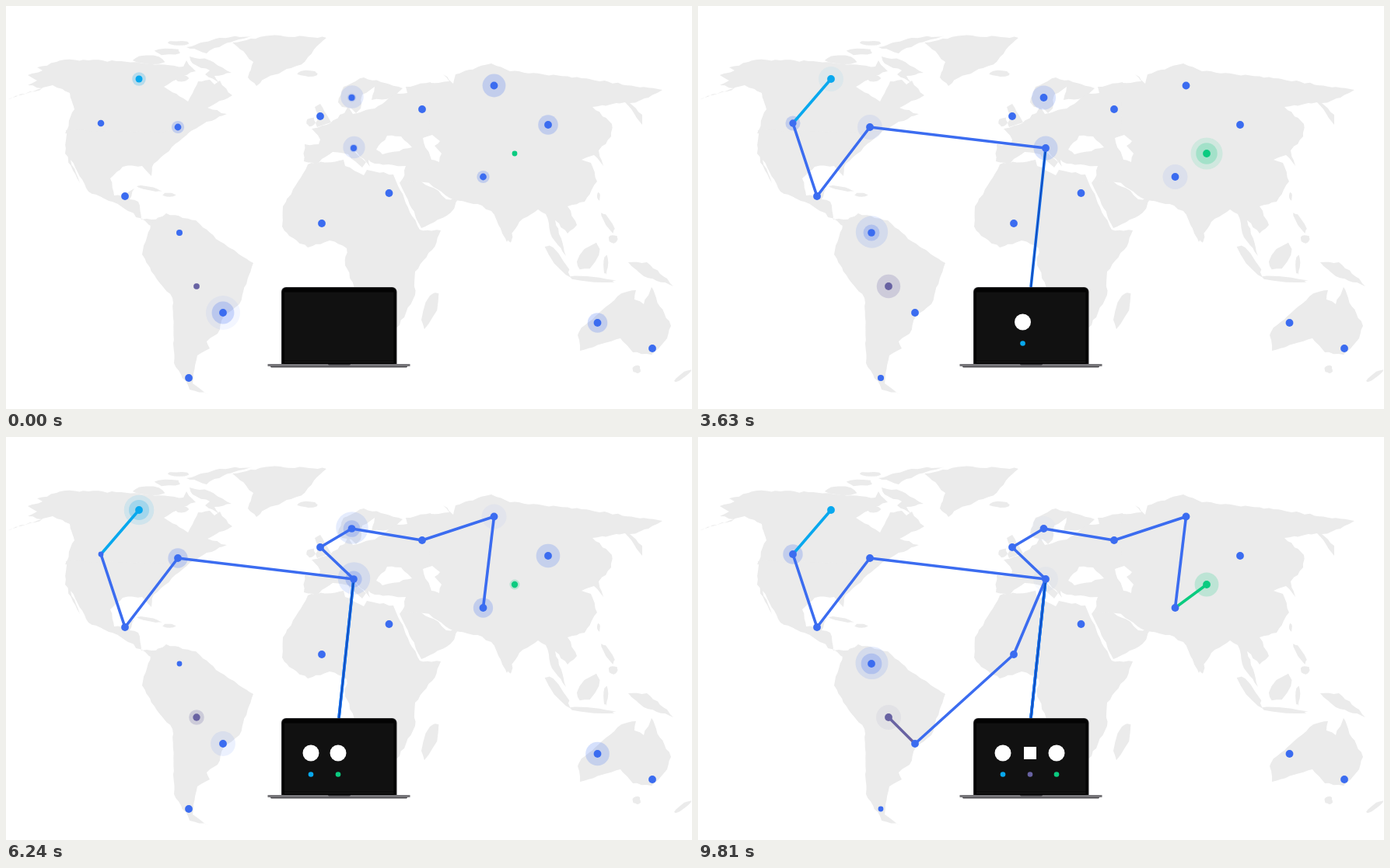
These frames come from a looping animation (882 by 519 pixels, 9840 ms). An HTML page with a canvas:

```html
<!DOCTYPE html>
<html lang="en">
<head>
<meta charset="utf-8">
<title>Network routes</title>
<style>
html, body { margin: 0; width: 100%; height: 100%; overflow: hidden; background: #fff; }
canvas { display: block; width: 882px; height: 519px; }
</style>
</head>
<body>
<canvas id="stage" width="882" height="519"></canvas>
<script>
const LOOP = 9840, PULSE = 3000;
const BLUE = '#3b6cf0', CYAN = '#08a8ee', GREEN = '#0bcb80', PURPLE = '#6862a2';
const LAND = '#ebebeb';
const ctx = document.getElementById('stage').getContext('2d');

const clamp = v => Math.min(1, Math.max(0, v));
const ramp = (t, from, to) => clamp((t - from) / (to - from));
const smooth = p => p * p * (3 - 2 * p);
const easeOut = (p, power) => 1 - (1 - p) ** power;

let seed = 7;
const noise = () => (seed = seed * 16807 % 2147483647) / 2147483647 - .5;

// A few corner points become a coast with small seeded bays
const map = [];
function coast(points, color = LAND, rough = 2.4) {
  const corners = points.split(' ').map(p => p.split(',').map(Number));
  const path = new Path2D();
  corners.forEach(([x, y], i) => {
    const [u, v] = corners[(i + 1) % corners.length];
    const parts = Math.max(1, Math.round(Math.hypot(u - x, v - y) / 6));
    path.lineTo(x, y);
    for (let k = 1; k < parts; k++) {
      path.lineTo(x + (u - x) * k / parts + rough * noise(), y + (v - y) * k / parts + rough * noise());
    }
  });
  path.closePath();
  map.push({ path, color });
}

function island(x, y, rx, ry, turn = 0, color = LAND) {
  const path = new Path2D();
  for (let a = 0; a < 6.2; a += .5) {
    const k = 1 + .35 * noise(), c = rx * k * Math.cos(a), s = ry * k * Math.sin(a);
    path.lineTo(x + c * Math.cos(turn) - s * Math.sin(turn), y + c * Math.sin(turn) + s * Math.cos(turn));
  }
  path.closePath();
  map.push({ path, color });
}

function buildAmericas() {
  coast('2,120 46,106 28,102 40,96 28,89 47,83 40,79 76,69 142,71 228,78 232,70 244,84 214,97 203,104 234,123 247,97 262,95 268,101 275,96 291,115 259,131 284,139 258,149 234,164 76,164 88,133 82,112 60,102');
  coast('77,160 236,162 190,203 187,219 175,206 150,207 134,222 139,244 149,245 165,235 159,249 170,252 174,275 198,275 188,284 148,258 106,239 83,198 95,228 76,190');
  coast('186,280 206,267 244,276 270,300 318,331 305,368 300,384 280,400 272,422 258,432 262,441 246,450 240,486 260,500 236,494 216,460 214,376 194,352 175,320');
  coast('291,47 340,38 412,41 396,56 384,72 334,93 322,103 311,92 318,72');
  coast('236,65 262,70 290,86 268,90 274,99 256,88 262,83 240,74');
  coast('232,53 270,42 317,38 268,54 258,61');
  island(184, 69, 20, 6);
  island(208, 59, 17, 4);
  island(222, 48, 15, 3);
  island(225, 93, 9, 4);
  island(388, 87, 12, 4);
  island(184, 235, 17, 2.5, .2);
  island(210, 243, 8, 2.5);
}

function buildAfrica() {
  coast('388,204 434,198 436,206 460,218 464,211 498,217 514,254 532,288 559,289 548,314 526,342 526,372 506,411 464,434 446,384 450,366 436,334 438,312 416,302 388,311 364,296 355,284 356,258');
  coast('506,228 514,216 556,238 566,249 582,248 572,266 534,286');
  island(545, 391, 24, 8, -1.25);
}

function buildEurope() {
  coast('427,124 434,104 460,92 510,106 496,118 470,121 474,104 458,114 456,132 450,138 444,132 432,130');
  coast('384,178 402,178 404,172 393,158 412,153 435,138 440,128 446,139 474,132 484,126 500,112 516,112 514,104 546,98 546,228 510,224 514,206 474,203 466,198 468,207 446,185 463,201 458,208 440,191 420,188 398,204 383,200');
  coast('398,151 402,142 397,130 404,126 418,150 400,156', LAND, 1);
  island(392, 149, 6, 5, -.7);
}

function buildAsia() {
  coast('544,99 570,97 562,88 575,100 578,88 624,74 648,84 740,93 844,108 826,118 802,125 818,140 818,153 796,124 754,130 779,152 778,168 762,186 768,206 756,192 740,198 752,202 760,226 744,252 722,258 734,282 722,293 706,276 720,322 702,298 694,268 684,262 660,278 644,304 624,264 612,257 570,247 544,228');
  island(648, 298, 3, 6);
  island(762, 245, 2, 5);
  island(774, 279, 15, 4, 1);
  island(781, 300, 6, 5);
  island(709, 326, 25, 6, .95);
  island(754, 352, 31, 3, .08);
  island(748, 324, 21, 11, -.9);
  island(771, 333, 12, 3, 1.6);
}

function buildOceania() {
  coast('800,330 824,330 850,351 858,361 820,348');
  coast('740,414 766,392 786,374 798,368 810,366 808,378 820,384 830,362 836,376 855,412 850,428 830,449 806,446 790,428 738,444 735,424');
  island(811, 468, 5, 5);
  island(870, 476, 15, 3, -.6);
}

function buildSeas() {
  coast('476,185 490,167 508,168 522,182 484,191', '#fff');
  coast('536,170 548,166 558,174 551,180 560,190 557,201 547,198', '#fff');
}

[buildAmericas, buildAfrica, buildEurope, buildAsia, buildOceania, buildSeas].forEach(build => build());

function drawMap() {
  for (const { path, color } of map) {
    ctx.fillStyle = color;
    ctx.fill(path);
  }
}

// Each place: x, y, pulse start, wide ring from the beginning, colour
const places = {};
const place = (name, x, y, start, wide = false, color = BLUE) => places[name] = { x, y, start, wide, color };
place('cyan', 171, 94, -340, false, CYAN);
place('west', 122, 151, 255);
place('east', 221, 156, -310);
place('gulf', 153, 245, 1720, true);
place('north', 223, 292, 210, true);
place('purple', 245, 361, -150, false, PURPLE);
place('brazil', 279, 395, -690);
place('south', 235, 479, 850, true);
place('britain', 404, 142, 1350);
place('sweden', 444.5, 118, -200, true);
place('italy', 447, 183, -190, true);
place('sahel', 406, 280, 1590, true);
place('nile', 492.5, 241, 1540, true);
place('volga', 535, 133, 1140, true);
place('siberia', 627.5, 102.5, -740);
place('lake', 697, 153, -560);
place('green', 654, 190, 0, false, GREEN);
place('indus', 613.5, 220, -310);
place('perth', 760.5, 408, -560);
place('sydney', 831, 441, 1910);

const laptopTop = { x: 428, y: 362 };
const routes = [
  { stops: 'italy sahel brazil purple', color: PURPLE, steps: [[7800, 0], [9500, 1]] },
  { stops: 'italy britain sweden volga siberia indus green', color: GREEN, steps: [[3700, 0], [5280, .636], [6240, .92], [6600, 1]] },
  { stops: 'italy east gulf west cyan', color: CYAN, steps: [[860, 0], [2220, .567], [2970, .885], [3270, 1]] }
];
for (const route of routes) {
  route.points = [laptopTop, ...route.stops.split(' ').map(name => places[name])];
}

function sample(steps, t) {
  if (t <= steps[0][0]) return steps[0][1];
  for (let i = 1; i < steps.length; i++) {
    const [a, from] = steps[i - 1], [b, to] = steps[i];
    if (t < b) return from + (to - from) * (t - a) / (b - a);
  }
  return steps[steps.length - 1][1];
}

function circle(x, y, r, color, alpha = 1) {
  if (r <= 0 || alpha <= 0) return;
  ctx.globalAlpha = alpha;
  ctx.fillStyle = color;
  ctx.beginPath();
  ctx.arc(x, y, r, 0, Math.PI * 2);
  ctx.fill();
  ctx.globalAlpha = 1;
}

function box(x, y, w, h, r, color) {
  ctx.fillStyle = color;
  ctx.beginPath();
  ctx.roundRect(x, y, w, h, r);
  ctx.fill();
}

function line(a, b, color, width) {
  ctx.strokeStyle = color;
  ctx.lineWidth = width;
  ctx.beginPath();
  ctx.moveTo(a.x, a.y);
  ctx.lineTo(b.x, b.y);
  ctx.stroke();
}

const phase = (t, start) => ((t - start + 400) % PULSE + PULSE) % PULSE - 400;

function drawRings({ x, y, start, wide, color }, t) {
  const p = phase(t, start);
  if (wide && p > 60) {
    circle(x + .5, y - 1, 4 + 17 * easeOut(ramp(p, 60, 560), 3), color, .13 * (1 - ramp(p, 640, 760)));
  } else if (!wide && p > 570) {
    circle(x, y, 19 + 3 * ramp(p, 570, 690), color, .12 * (1 - ramp(p, 640, 740)));
  }
  if (p > 150) {
    circle(x, y, 4 + 12 * easeOut(ramp(p, 150, 1000), 2), color, .23 * (1 - ramp(p, 780, 1040)));
  }
}

function drawDot({ x, y, start, color }, t) {
  const p = phase(t, start);
  const shrink = p < 0 ? ramp(p, -330, -130) : 1 - ramp(p, 30, 450);
  circle(x, y, 4.9 - 1.5 * shrink, color);
}

function drawRoute({ points, color, steps }, t) {
  const lengths = points.slice(1).map((p, i) => Math.hypot(p.x - points[i].x, p.y - points[i].y));
  let left = sample(steps, t) * lengths.reduce((a, b) => a + b);
  for (let i = 0; i < lengths.length && left > 0; i++) {
    const a = points[i], b = points[i + 1], k = Math.min(1, left / lengths[i]);
    const tip = { x: a.x + (b.x - a.x) * k, y: a.y + (b.y - a.y) * k };
    line(a, tip, i === 0 ? '#1673ee' : i === lengths.length - 1 ? color : BLUE, 3.6);
    if (i === 0) line(a, tip, '#153fa8', 1.2);
    left -= lengths[i];
  }
}

function drawLaptop() {
  box(354, 362, 148.5, 101, [6, 6, 0, 0], '#29292b');
  box(355, 363, 146.5, 99, [5, 5, 0, 0], '#030303');
  box(358, 368.5, 140.5, 88.5, 0, '#111');
  box(358, 458, 140.5, 1, 0, '#222');
  box(336.5, 461, 183, 3, 0, '#77767a');
  box(340, 464, 176, 1.6, [0, 0, 4, 4], '#4a494d');
  box(414, 461, 29, 1.8, [0, 0, 2, 2], '#3b3a3e');
}

function drawApp(x, scale, color, square) {
  if (scale <= 0) return;
  const r = (square ? 8 : 10.5) * scale;
  if (square) box(x - r, 407 - r, 2 * r, 2 * r, 0, '#fff');
  else circle(x, 407, r, '#fff');
  circle(x, 434.5, 3.3 * scale, color);
}

function drawApps(t) {
  const second = smooth(ramp(t, 3460, 3960)), third = smooth(ramp(t, 7340, 7840));
  const grow = p => ramp(p, .3, 1);
  drawApp(427 - 35 * second, smooth(ramp(t, 300, 700)), CYAN);
  drawApp(427, grow(third), PURPLE, true);
  drawApp(427 + 34 * third, grow(second), GREEN);
}

function draw(t) {
  const all = Object.values(places);
  ctx.clearRect(0, 0, 882, 519);
  drawMap();
  all.forEach(p => drawRings(p, t));
  routes.forEach(r => drawRoute(r, t));
  all.forEach(p => drawDot(p, t));
  drawLaptop();
  drawApps(t);
}

const began = performance.now();
function tick() {
  draw((performance.now() - began) % LOOP);
  requestAnimationFrame(tick);
}
tick();
</script>
</body>
</html>
```
